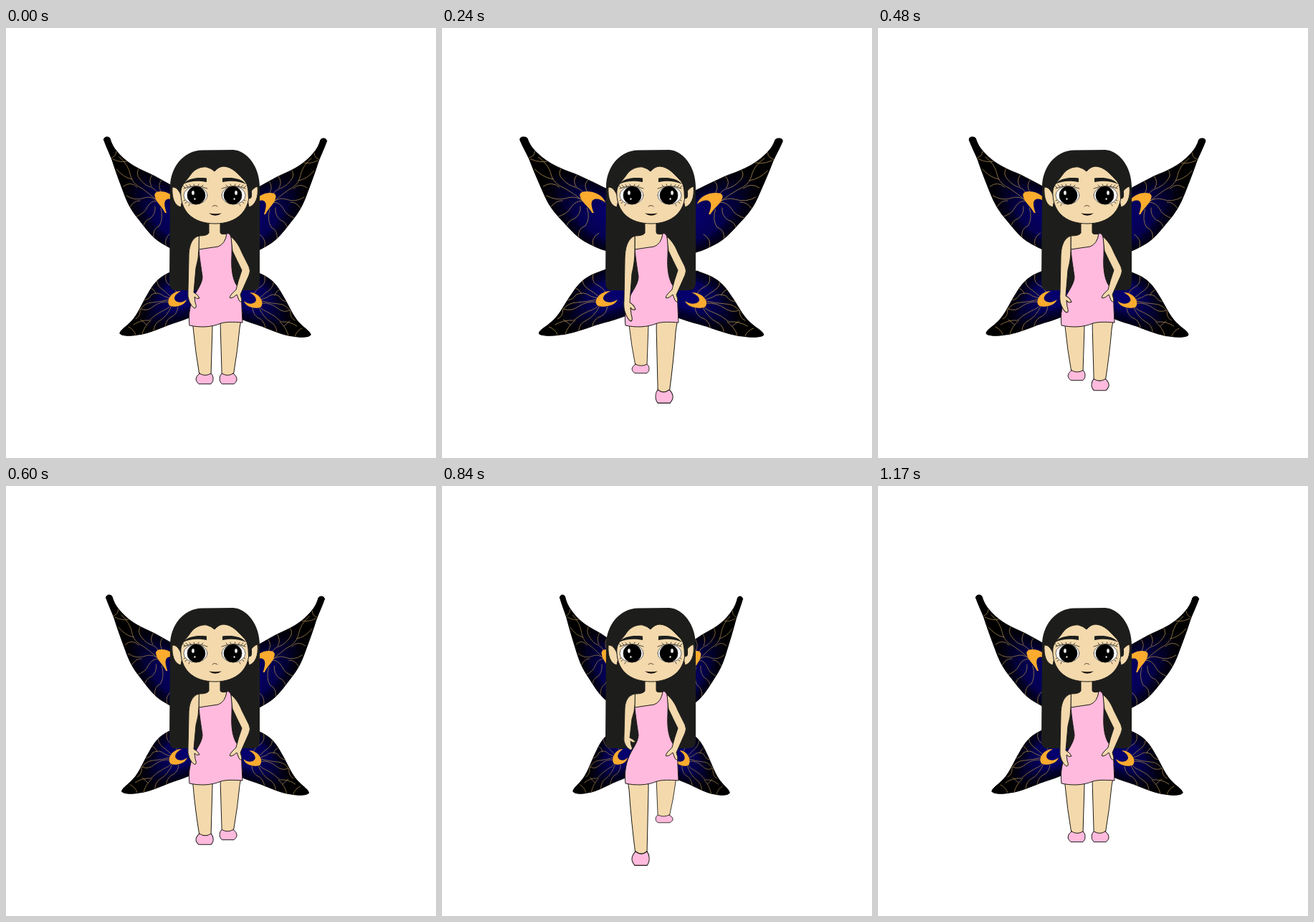
An HTML page with a canvas that plays this animation: 600 by 600 pixels, repeating every 1200 ms.

```html
<!DOCTYPE html>
<html lang="en">
<head>
<meta charset="utf-8">
<title>Walking fairy</title>
<style>
  html, body { margin: 0; width: 100%; height: 100%; overflow: hidden; background: #fff; }
  canvas { display: block; width: 600px; height: 600px; }
</style>
</head>
<body>
<canvas id="stage" width="600" height="600"></canvas>
<script>
const ctx = document.getElementById('stage').getContext('2d');

const SKIN = '#f3d9ac', HAIR = '#1d1e1c', PINK = '#ffbadd', GOLD = '#a0834a', MOON = '#fbab2e';
const CENTER = 292;
const FRAME = 30, FRAMES = 40;
const KEYS = [0, 9, 19, 29, 39];

// Scale at the first and second extreme of the walk cycle
const SWING = {
  wings: [1.2, 0.8],
  arm: [1.2, 0.75],
  leftLeg: [0.83, 1.365],
  rightLeg: [1.3, 0.7]
};

function swing([first, second], frame) {
  const values = [1, first, 1, second, 1];
  let i = 0;
  while (i < 3 && frame >= KEYS[i + 1]) i++;
  const u = (frame - KEYS[i]) / (KEYS[i + 1] - KEYS[i]);
  return values[i] + (values[i + 1] - values[i]) * u;
}

const path = d => new Path2D(d);

const shapes = {
  upperWing: path('M136.5 156C136.5 151 143 151 145 154C147 161 150 167 155 172.5C163 182 172 189 181 194C190 199 198 202 206 206C217 212 228 218 238 224L270 245V325L237 310C230 308 224 304 217 300C205 293 196 281 186 268C176 256 170 246 164 229C158 213 153 200 148 184C145 176 140 166 136.5 156Z'),
  lowerWing: path('M159 426C159 422 166 418 171 413C177 408 181 402 185 395C190 386 193 379 198 371C204 360 210 352 218 347C225 342 232 340 238 337L280 350V394C268 399 258 403 248 407C237 411 229 413 220 417C207 422 195 427 184 428C174 430 160 430 159 426Z'),
  upperVeins: path('M145 182Q154 180 154 172M149 183Q163 190 174 184M158 180Q171 190 174 207Q177 218 190 224Q200 231 209 239M154 197Q164 209 176 211M164 221Q174 213 183 222M168 234Q180 242 193 237Q202 234 210 240M173 250Q179 240 187 241M186 195Q180 203 187 211Q194 220 202 222Q209 225 211 230M204 205Q198 213 203 221M217 212Q211 219 216 228M179 264Q193 260 197 250Q202 241 211 241M191 279Q193 268 201 266Q209 260 208 249M206 294Q204 280 214 276Q220 266 216 251M224 306Q219 294 230 286'),
  lowerVeins: path('M181 406Q188 402 187 393Q194 383 204 383Q216 382 227 379M188 392Q197 396 205 389Q215 381 227 382M191 380Q199 380 203 372Q212 367 220 374L228 377M200 362Q208 365 209 371M211 348Q209 358 217 364Q224 369 229 374M224 341Q220 352 227 358Q235 362 238 369M178 414Q188 407 200 408Q209 399 218 395Q226 392 230 387M190 427Q193 416 202 408M206 422Q207 412 215 408Q224 403 231 388M222 416Q224 405 233 402Q239 398 240 389M171 417Q178 420 181 428M188 407Q194 412 196 414'),
  upperMoon: path('M238 244C235 234 226 228 215 228C209 228 206 231 208 236C210 244 217 248 222 258L224 258C221 249 219 240 226 238.5Q232 238 238 244Z'),
  lowerMoon: path('M244 367C231 367 223 380 228 387C235 391 249 388 252 379C246 384 237 384 235 378C235 373 239 370 244 367Z'),
  backHair: path('M229 222C229 195 247 171 274 170.5L317 170C336 171 354 193 354 222V356Q354 366 344 366H237Q228 366 228 356Z'),
  leg: path('M257 397L261 417Q264 450 270 485Q278 488 286 484L288 417V397Z'),
  shoe: path('M270 482Q265 486 265 490Q265 493 269 496.7H286Q290 493 289 488Q289 485 286 482Q278 487 270 482Z'),
  torso: path('M283 268V286Q281 290 269 290V312H300L309 287Q299 289 299 285V268Z'),
  dress: path('M269 309Q282 307 296 305Q306 301 308 287Q311 285 314 291C316 299 315 309 315 318C314 336 316 347 320 356C327 366 329 378 329 390L330 411C316 410 307 410 300 412C286 418 270 418 256 415C254 399 257 384 264 371C270 361 274 354 274 347C272 333 270 321 269 309Z'),
  leftArm: path('M269 290C258 293 255 306 255 320L254 366Q253 376 256 382Q259 389 263 391Q267 391 264 383L263 375Q266 379 270 377Q268 372 262 369L265 335Q269 321 269 309Z'),
  rightArm: path('M314 291C321 297 326 305 329 313L339 333Q342 339 339 345L327 372Q329 378 329 381Q326 384 324 377L322 372Q317 377 313 377Q311 376 315 371L321 365Q324 352 329 338Q322 324 316 311Q315 302 314 291Z'),
  leftEar: path('M232 222C238 221 244 229 246 240L244 250C235 248 231 237 232 222Z'),
  rightEar: path('M351 221C346 222 339 229 337 240L339 250C347 248 353 237 351 221Z'),
  face: path('M244 226C246 217 253 212 258 204C263 197 272 193 280 194Q287 196 291 200Q297 193 304 193C316 194 323 203 330 210Q338 217 339 230C340 255 322 273 292 273C261 273 242 256 244 226Z'),
  sideburn: path('M336 218Q344 220 343 235Q342 239 338 238Q338 228 336 218Z'),
  brow: path('M247 218C254 210 265 208 280 209.5V215C268 213 258 213 247 218Z'),
  lashes: path('M248 224Q264 217 281 224M250 223L247 220M254 222L251 219M258 221L256 218.5M263 220L262 218M268 220L269 218M273 221L275 219M250 240L248 241M252 243L250 244.5M256 246L255 248'),
  nose: path('M288 249Q291 246 295 249'),
  mouth: path('M283 258.5Q292 260 301 258.5Q292 265 283 258.5Z')
};

function paint(shape, fill, line = '#1c1a17', width = 1) {
  ctx.fillStyle = fill;
  ctx.fill(shape);
  if (line) trace(shape, line, width);
}

function trace(shape, color, width) {
  ctx.strokeStyle = color;
  ctx.lineWidth = width;
  ctx.stroke(shape);
}

function oval(x, y, rx, ry, fill, line) {
  const p = new Path2D();
  p.ellipse(x, y, rx, ry, 0, 0, Math.PI * 2);
  paint(p, fill, line, 0.8);
}

function withTransform(sx, sy, dx, dy, draw) {
  ctx.save();
  ctx.transform(sx, 0, 0, sy, dx, dy);
  draw();
  ctx.restore();
}

const stretchY = (scale, anchor, draw) => withTransform(1, scale, 0, anchor * (1 - scale), draw);
const mirror = (axis, dy, draw) => withTransform(-1, 1, axis * 2, dy, draw);

function shade(x, y, radius) {
  const g = ctx.createRadialGradient(x, y, 5, x, y, radius);
  g.addColorStop(0, '#06006e');
  g.addColorStop(0.4, '#04004c');
  g.addColorStop(0.75, '#02001c');
  g.addColorStop(1, '#000');
  return g;
}

const upperShade = shade(246, 258, 96);
const lowerShade = shade(248, 374, 76);

function wing(shape, fill, veins, moon) {
  paint(shape, fill, '#050507', 1);
  ctx.save();
  ctx.clip(shape);
  // Darken softly towards the rim
  for (const width of [28, 20, 12]) trace(shape, 'rgba(0,0,0,.25)', width);
  trace(veins, GOLD, 0.8);
  ctx.restore();
  paint(moon, MOON, null);
}

function wingPair() {
  wing(shapes.upperWing, upperShade, shapes.upperVeins, shapes.upperMoon);
  wing(shapes.lowerWing, lowerShade, shapes.lowerVeins, shapes.lowerMoon);
}

function leg() {
  paint(shapes.leg, SKIN);
  paint(shapes.shoe, PINK);
}

function leftEye() {
  oval(264.5, 233.5, 16.5, 12.5, '#fff', '#444');
  oval(265.5, 233.5, 12.5, 12.5, '#000');
  oval(261, 230, 2.2, 3.3, '#fff');
  oval(263.5, 238.5, 1.5, 1.6, '#fff');
  paint(shapes.brow, HAIR, null);
  trace(shapes.lashes, '#222', 0.8);
}

function head() {
  paint(shapes.leftEar, SKIN);
  paint(shapes.rightEar, SKIN);
  paint(shapes.face, SKIN);
  paint(shapes.sideburn, HAIR, null);
  leftEye();
  mirror(291, 0, leftEye);
  trace(shapes.nose, '#4a3c28', 0.9);
  paint(shapes.mouth, '#17120f', null);
}

function draw(frame) {
  ctx.fillStyle = '#fff';
  ctx.fillRect(0, 0, 600, 600);

  const spread = swing(SWING.wings, frame);
  withTransform(spread, 1, CENTER * (1 - spread), 0, () => {
    wingPair();
    mirror(CENTER, 2, wingPair);
  });

  paint(shapes.backHair, HAIR, null);
  stretchY(swing(SWING.leftLeg, frame), 397, leg);
  stretchY(swing(SWING.rightLeg, frame), 397, () => mirror(293.6, 0, leg));
  paint(shapes.torso, SKIN);
  paint(shapes.dress, PINK);
  stretchY(swing(SWING.arm, frame), 290, () => paint(shapes.leftArm, SKIN));
  paint(shapes.rightArm, SKIN);
  head();
}

function tick() {
  draw(Math.floor(performance.now() / FRAME) % FRAMES);
  requestAnimationFrame(tick);
}
ctx.lineJoin = ctx.lineCap = 'round';
tick();
</script>
</body>
</html>
```
